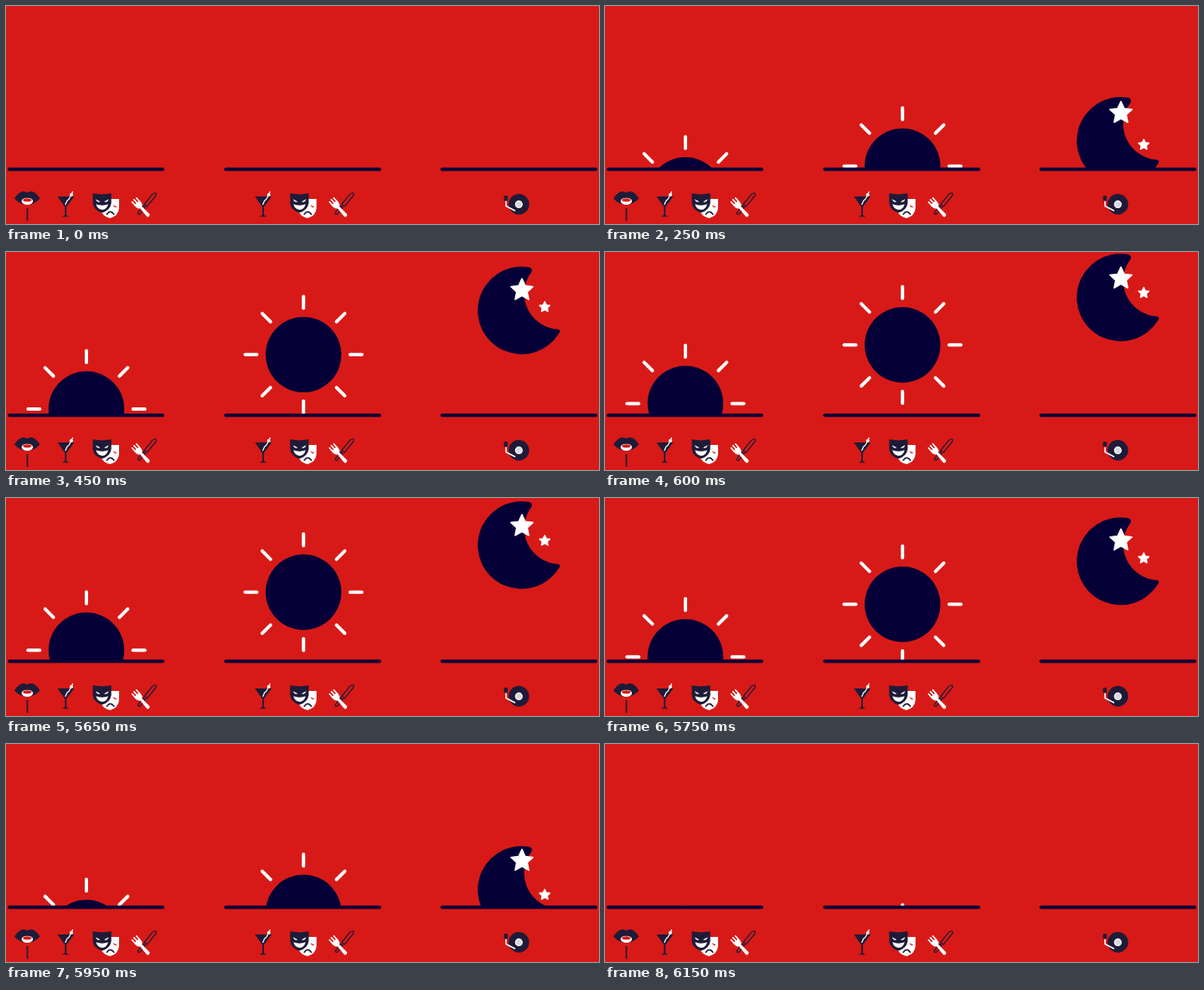
Write an HTML page that moves like this. It is 708 px wide and 261 px high and loops after 7250 ms.

```html
<!DOCTYPE html>
<html lang="en">
<head>
<meta charset="utf-8">
<title>Morning, noon and night</title>
<style>
  html, body { margin: 0; width: 100%; height: 100%; overflow: hidden; background: #d71a17; }
  svg { display: block; width: 100%; height: 100%; }
  .navy { fill: #040037; }
  .ink { fill: #1e1b38; }
  .white { fill: #fff; }
  .red { fill: #d71a17; }
  .ray { stroke: #fff; stroke-width: 4; stroke-linecap: round; }
  .star { fill: #fff; stroke: #fff; stroke-width: 1.6; stroke-linejoin: round; }
  .line { fill: none; stroke-linecap: round; stroke-linejoin: round; }
</style>
</head>
<body>
<svg viewBox="0 0 708 261">
  <defs>
    <clipPath id="sky"><rect width="708" height="194.5"/></clipPath>

    <g id="lips">
      <path class="ink" d="M10 230.5Q14 223.5 20 222Q23.5 221.6 25.3 223.6Q27 221.6 31 222Q36.500 223.500 40.500 230.500Q34 237.500 25.300 238.300Q16.500 237.500 10 230.500Z"/>
      <ellipse class="white" cx="25.4" cy="233.700" rx="6.800" ry="4.200"/>
      <ellipse class="red" cx="25.4" cy="232.300" rx="5" ry="2"/>
      <path class="ink" d="M18 231Q25 228 33 231L32 229H19Z"/>
      <path class="line" d="M25.500 242.500V256.500" stroke="#1e1b38" stroke-width="1.700"/>
    </g>

    <g id="cocktail">
      <path class="ink" d="M61.500 228H81.500L72.200 240.500V250.300L75.500 252.300H66.800L70.300 250.300V240.500Z"/>
      <path class="line" d="M71 237.500L73 233L75 231.500L77.500 227L79.500 222.500" stroke="#fff" stroke-width="1.300"/>
      <circle class="white" cx="78" cy="226" r="2"/>
    </g>

    <g id="masks">
      <path class="white" d="M115 231H135V242Q134 251.500 124.500 254Q115 252 113 244Z"/>
      <path class="ink" d="M103.600 224.300Q114.500 226.500 125.700 224.300V236Q124.500 244.500 114.700 247.500Q104.500 244.500 103.600 236Z"/>
      <path class="white" d="M107 231.200L112.700 234.300Q109 236 107 231.200ZM122.700 231.200L117 234.300Q121 236 122.700 231.200ZM107.500 237.300Q114.800 240 122 237.300Q120.500 243.700 114.800 244Q109 243.500 107.500 237.300Z"/>
      <path class="line" d="M120.500 249.300Q124.500 243.600 128.800 249.300" stroke="#1e1b38" stroke-width="1.700"/>
      <path class="red" d="M127.700 238.300L132.500 240.500Q129.500 242.700 127.700 238.300Z"/>
    </g>

    <g id="cutlery">
      <g transform="translate(167.500 237.500) rotate(39)">
        <path class="line" d="M-1.900 1.500V-14Q0 -20 2.300 -16V1.500ZM-1.500 3.500H1.500V14Q0 16 -1.500 14Z" stroke="#1e1b38" stroke-width="1.300"/>
      </g>
      <g transform="translate(161.500 241.500) rotate(-42)">
        <path class="line" d="M-3.500 -12.500V-7M0 -13V-6M3.500 -12.500V-7" stroke="#fff" stroke-width="1.700"/>
        <path class="white" d="M-4.300 -8H4.300V-5Q4 -1.500 1.500 -.5L2.200 12.500Q0 15.500 -2.200 12.500L-1.500 -.5Q-4 -1.500 -4.300 -5Z"/>
      </g>
    </g>
  </defs>

  <rect class="red" width="708" height="261"/>
  <g id="scene" clip-path="url(#sky)"></g>

  <path class="line" d="M4 195.500H187M262.500 195.500H446M520.700 195.500H704" stroke="#040037" stroke-width="4.200"/>

  <use href="#lips"/>
  <use href="#cocktail"/>
  <use href="#masks"/>
  <use href="#cutlery"/>
  <g transform="translate(235.700)">
    <use href="#cocktail"/>
    <use href="#masks"/>
    <use href="#cutlery"/>
  </g>
  <g>
    <circle class="ink" cx="612.300" cy="237.400" r="12.300"/>
    <circle cx="612.300" cy="237.400" r="4" fill="#d9d8de" stroke="#fff" stroke-width="1.200"/>
    <path class="line" d="M597 230V239.500L607.500 245" stroke="#fff" stroke-width="1.600"/>
    <rect class="ink" x="594.500" y="227" width="4.600" height="6.500" rx="1.500"/>
  </g>
</svg>
<script>
const LOOP = 7250, STEP = 50;   // picture holds for 50 ms at a time
const MOVE = 640;               // length of a rise or a fall
const RISE_END = 573, FALL_START = 5606;

const scene = document.getElementById("scene");

function add(parent, tag, attrs) {
  const node = document.createElementNS("http://www.w3.org/2000/svg", tag);
  for (const key in attrs) node.setAttribute(key, attrs[key]);
  parent.appendChild(node);
  return node;
}

function sun(cx, cy) {
  const g = add(scene, "g", {});
  add(g, "circle", { class: "navy", cx, cy, r: 45.2 });
  for (let i = 0; i < 8; i++) {
    const c = Math.cos(i * Math.PI / 4), s = Math.sin(i * Math.PI / 4);
    add(g, "line", {
      class: "ray",
      x1: cx + 55.7 * c, y1: cy + 55.7 * s,
      x2: cx + 69.7 * c, y2: cy + 69.7 * s
    });
  }
  return g;
}

function moon() {
  return add(scene, "path", {
    class: "navy",
    d: "M623 2.600Q629.500 3.500 627.500 8.500A42.700 42.700 0 0 0 658 77" +
       "Q663 77.500 660.500 81.500A52.400 52.400 0 1 1 623 2.600Z"
  });
}

function star(cx, cy, radius) {
  const points = [];
  for (let i = 0; i < 10; i++) {
    const r = i % 2 ? radius * 0.48 : radius;
    const a = (i / 5 - 0.5) * Math.PI;
    points.push(cx + r * Math.cos(a), cy + r * Math.sin(a));
  }
  return add(scene, "polygon", { class: "star", points: points.join(" ") });
}

// Each body and how far it sinks
const bodies = [
  [sun(96, 181.4), 88],
  [sun(355.2, 111.2), 158],
  [moon(), 210],
  [star(616, 31.8, 13.8), 189],
  [star(643.2, 49, 6.4), 230]
];

function easeInOut(x) {
  x = Math.min(1, Math.max(0, x));
  return x < 0.5 ? 2 * x * x : 1 - 2 * (1 - x) ** 2;
}

function draw(time) {
  const t = Math.floor((time % LOOP) / STEP) * STEP;
  const sunk = easeInOut(Math.max(RISE_END - t, t - FALL_START) / MOVE);
  for (const [node, depth] of bodies) {
    node.setAttribute("transform", `translate(0 ${(sunk * depth).toFixed(2)})`);
  }
}

const start = performance.now();
function tick() {
  draw(performance.now() - start);
  requestAnimationFrame(tick);
}
tick();
</script>
</body>
</html>
```
